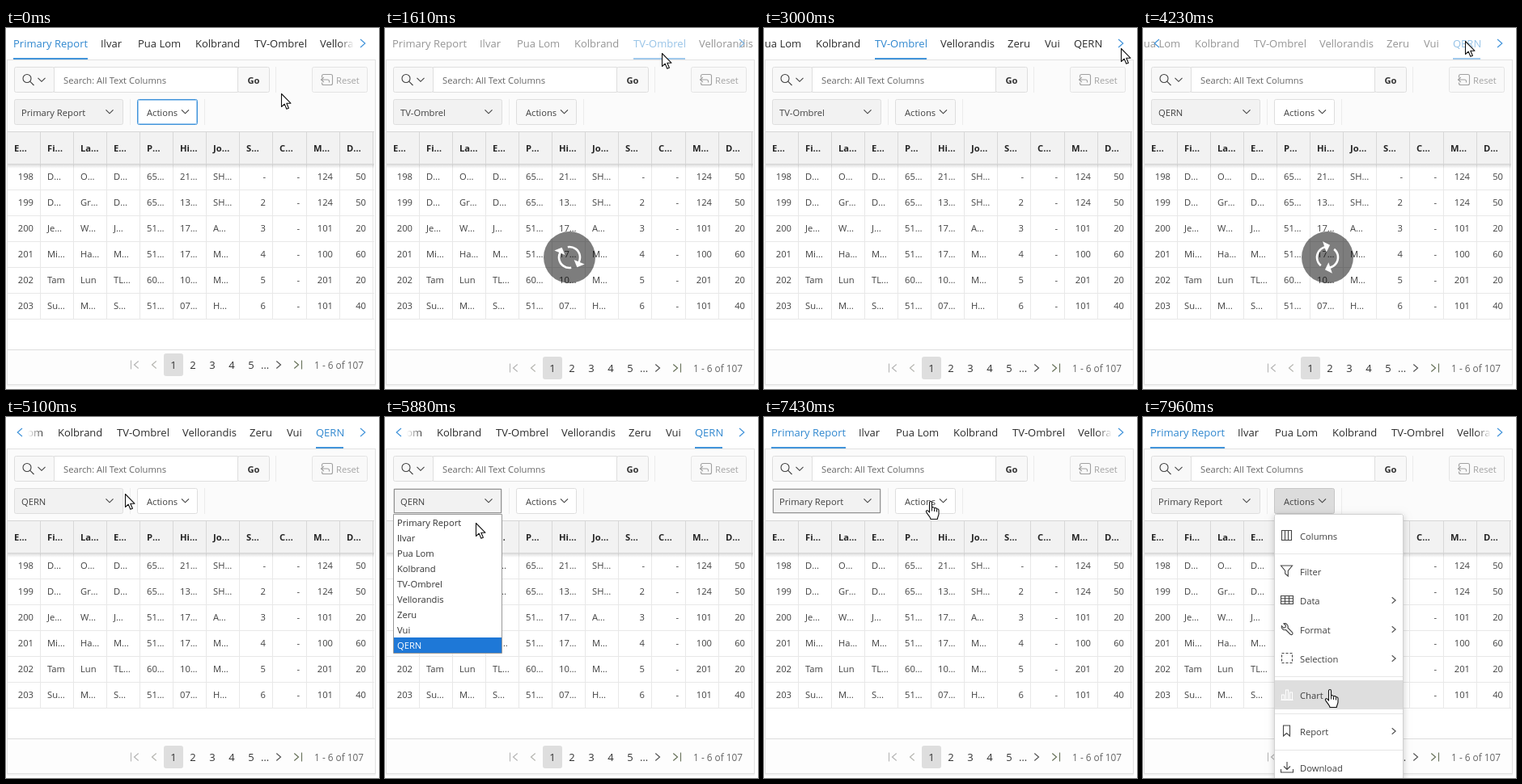
Write an HTML page with a canvas that moves like this. It is 461 px wide and 447 px high and loops after 8000 ms.

```html
<!DOCTYPE html>
<html lang="en">
<head>
<meta charset="utf-8">
<title>Report tabs</title>
<style>
html, body { margin: 0; width: 100%; height: 100%; overflow: hidden; background: #fff; }
canvas { display: block; width: 461px; height: 447px; }
</style>
</head>
<body>
<canvas id="stage"></canvas>
<script>
const W = 461, H = 447, LOOP = 8000, STEP = 77.35;
const BLUE = '#4294da', INK = '#404040', LINE = '#dedede';
const canvas = document.getElementById('stage');
const ctx = canvas.getContext('2d');
const dpr = window.devicePixelRatio || 1;
canvas.width = W * dpr;
canvas.height = H * dpr;

const TABS = [
  ['Primary Report', 9, 92], ['Ilvar', 117, 29], ['Pua Lom', 163, 54],
  ['Kolbrand', 234, 57], ['TV-Ombrel', 307, 64], ['Vellorandis', 388, 67],
  ['Zeru', 471, 30], ['Vui', 517, 20], ['QERN', 553, 34]
];
const HEADS = 'E Fi La E P Hi Jo S C M D'.split(' ');
const SHORT_HEADS = 'E Fi L E P H J S C M D'.split(' ');
const ROWS = [
  '198 D… O… D… 65… 21… SH… - - 124 50',
  '199 D… Gr… D… 65… 13… SH… 2 - 124 50',
  '200 Je… W… J… 51… 17… A… 3 - 101 20',
  '201 Mi… Ha… M… 51… 17… M… 4 - 100 60',
  '202 Tam Lun TL… 60… 10… M… 5 - 201 20',
  '203 Su… M… S… 51… 07… H… 6 - 101 40'
].map(r => r.split(' '));
const MENU = [
  ['Columns', 147], ['Filter', 191], ['Data', 227, 1], ['Format', 263, 1],
  ['Selection', 299, 1], ['Chart', 344], ['Report', 389, 1], ['Download', 434]
];
// Each load: tab, click, grid cleared, rows back, finished, spinner angle at a time
const LOADS = [
  { tab: 4, click: 1080, clear: 1225, data: 1385, end: 2310, deg: 65, at: 1610 },
  { tab: 8, click: 3535, clear: 3610, data: 3925, end: 4860, deg: 110, at: 4230 },
  { tab: 0, click: 6425, clear: 6425, data: 6880, end: 7185, deg: 0, at: 6660 }
];
const POINTER = [
  [0, 340, 82], [380, 340, 82], [760, 349, 52], [1080, 342, 32], [2310, 342, 32],
  [2700, 441, 26], [3160, 441, 26], [3390, 398, 17], [4780, 398, 17],
  [5095, 147, 96], [5300, 130, 104], [5570, 130, 104], [5880, 112, 132],
  [6110, 112, 132], [6270, 110, 143], [6880, 110, 143], [7260, 150, 124],
  [7420, 204, 105], [7500, 204, 107], [7955, 229, 338]
];

const clamp = v => Math.max(0, Math.min(1, v));
const ease = v => { v = clamp(v); return v * v * (3 - 2 * v); };

function fill(x, y, w, h, color) {
  ctx.fillStyle = color;
  ctx.fillRect(x, y, w, h);
}
function box(x, y, w, h, bg, border, r = 2) {
  ctx.beginPath();
  ctx.roundRect(x + .5, y + .5, w - 1, h - 1, r);
  ctx.fillStyle = bg;
  ctx.fill();
  ctx.strokeStyle = border;
  ctx.lineWidth = 1;
  ctx.stroke();
}
function text(s, x, y, { size = 11.2, color = INK, bold, align = 'left' } = {}) {
  ctx.font = `${bold ? 700 : 400} ${size}px "Open Sans", "Noto Sans", sans-serif`;
  ctx.fillStyle = color;
  ctx.textAlign = align;
  ctx.fillText(s, x, y);
}
function stroke(d, color = INK, w = 1.1, x = 0, y = 0) {
  ctx.save();
  ctx.translate(x, y);
  ctx.strokeStyle = color;
  ctx.lineWidth = w;
  ctx.stroke(new Path2D(d));
  ctx.restore();
}
const down = (x, y) => stroke('M-4.5 -2.2L0 2.3L4.5 -2.2', INK, 1.1, x, y);
function arrow(x, y, dir, color, bar, s = 1) {
  stroke(`M${-2.7 * dir * s} ${-4.5 * s}L${2.5 * dir * s} 0L${-2.7 * dir * s} ${4.5 * s}`, color, 1.2, x, y);
  if (bar) stroke('M0 -5.5V5.5', color, 1.1, x + 6.5 * dir, y);
}

function fade(x0, x1) {
  const g = ctx.createLinearGradient(x0, 0, x1, 0);
  g.addColorStop(0, '#fff0');
  g.addColorStop(1, '#fff');
  ctx.fillStyle = g;
  ctx.fillRect(Math.min(x0, x1), 0, Math.abs(x1 - x0), 36);
}

function drawTabs(s) {
  ctx.save();
  ctx.beginPath();
  ctx.rect(1, 0, 456, 40);
  ctx.clip();
  ctx.globalAlpha = s.dim ? .5 : 1;
  TABS.forEach(([name, x, w], i) => {
    x -= s.scroll;
    const on = i === s.tab;
    text(name, x, 24, { size: 13, color: on ? '#2f87cf' : '#2b2b2b' });
    if (on) fill(x, 37, w, 2, BLUE);
  });
  ctx.restore();
  if (!s.dim) {
    if (s.scroll < 169) { fade(412, 430); fill(430, 0, 31, 36, '#fff'); }
    if (s.left) { fill(0, 0, 27, 36, '#fff'); fade(46, 27); }
  }
  if (s.left) arrow(17, 19, -1, BLUE, false, 1.1);
  arrow(441, 19, 1, s.dim && s.scroll < 1 ? '#7fb5e4' : BLUE, false, 1.1);
}

function drawTools(s) {
  box(10, 48, 50, 32, '#f8f8f8', LINE);
  box(59, 48, 228, 32, '#fff', LINE, 0);
  box(286, 48, 40, 32, '#f8f8f8', LINE);
  ctx.beginPath();
  ctx.arc(26, 62.5, 5, 0, 7);
  ctx.strokeStyle = INK;
  ctx.lineWidth = 1.1;
  ctx.stroke();
  stroke('M29.6 66.2L34.5 71');
  down(44, 64);
  text('Search: All Text Columns', 71, 69, { color: '#666' });
  text('Go', 306, 69, { bold: true, color: '#333', align: 'center' });
  for (const [x, y] of [[333, 48], [153, 88], [245, 88]]) fill(x, y, 1, 32, '#ececec');

  box(378, 48, 69, 32, '#f9f9f9', '#e4e4e4');
  stroke('M1 4V2Q1 0 3 0H12Q14 0 14 2V11Q14 13 12 13H3Q1 13 1 11V10M0 6.5H8Q10 6.5 10 8.5V10M3.3 3.5L0 6.5L3.3 9.5', '#a0a0a0', 1.1, 389.5, 57.5);
  text('Reset', 408, 69, { color: '#a4a4a4' });

  box(10, 88, 135, 32, '#f2f2f2', LINE);
  if (s.selectFocus) {
    ctx.setLineDash([1, 1]);
    stroke('M11.5 89.5H143.5V118.5H11.5Z', '#333', 1);
    ctx.setLineDash([]);
  }
  text(TABS[s.tab][0], 19, 108.5);
  down(128, 103.5);

  const bg = s.menu ? '#dcdcdc' : s.actionSoft ? '#f8f8f8' : '#fff';
  box(162, 88, 75, 32, bg, s.actionFocus ? BLUE : s.menu ? '#c6c6c6' : LINE);
  if (s.actionFocus) stroke('M163.5 89.5H235.5V118.5H163.5Z', '#9dc9ee', 1);
  text('Actions', 174, 108.5);
  down(221.5, 103.5);
}

function drawGrid(s) {
  const colX = i => Math.round(s.empty ? 1 + i * 40 : .6 + i * 41.1);
  fill(2, 168, 454, 230, '#fff');
  fill(2, 128, 453, 41, '#f2f2f2');
  fill(2, 128, 453, 1, '#d6d6d6');
  fill(2, 168, 453, 1, '#d6d6d6');
  for (let i = 0; i < 11; i++) {
    fill(colX(i + 1), 129, 1, 39, '#d8d8d8');
    text((s.empty ? SHORT_HEADS : HEADS)[i] + '…', colX(i) + 9, 153, { bold: true, color: '#262626' });
  }
  if (s.empty) {
    if (s.hoverHead) {
      for (let y = 133; y < 165; y += 2) { fill(85, y, 1, 1, '#888'); fill(87, y, 1, 1, '#888'); }
      box(103, 133, 16, 16, '#fff', LINE);
      stroke('M-3.5 1.7L0 -1.8L3.5 1.7', '#666', 1.1, 111, 141);
    }
    return;
  }
  ROWS.forEach((row, r) => {
    const top = 169 + r * 32;
    fill(2, top + 31, 453, 1, '#e8e8e8');
    row.forEach((cell, c) => {
      fill(colX(c + 1), top, 1, 32, '#e8e8e8');
      const right = c === 0 || c > 6;
      text(cell, right ? colX(c + 1) - 8 : colX(c) + 9, top + 19, { align: right ? 'right' : 'left' });
    });
  });
  const shade = ctx.createLinearGradient(0, 169, 0, 174);
  shade.addColorStop(0, 'rgba(0,0,0,.13)');
  shade.addColorStop(1, 'rgba(0,0,0,0)');
  fill(2, 169, 453, 5, shade);
}

function drawFooter(s) {
  fill(2, 398, 454, 43, '#fdfdfd');
  fill(2, 398, 454, 1, LINE);
  if (s.empty) {
    arrow(352, 419, -1, '#aaa', true);
    arrow(374, 419, -1, '#aaa');
    arrow(398, 419, 1, '#aaa');
    arrow(420, 419, 1, '#aaa', true);
    return;
  }
  ctx.save();
  ctx.translate(0, s.pagerDrop);
  arrow(161, 417, -1, '#b5b5b5', true);
  arrow(183, 417, -1, '#b5b5b0');
  box(195, 403, 24, 28, '#dedede', '#dedede');
  for (let i = 0; i < 5; i++) text(i + 1, 207 + i * 24, 422, { size: 13, color: '#333', align: 'center' });
  text('…', 320, 422, { size: 13, align: 'center', color: '#333' });
  arrow(337, 417, 1, '#555');
  arrow(359, 417, 1, '#667058', true);
  text('1 - 6 of 107', 442, 422, { size: 11.8, color: '#666', align: 'right' });
  ctx.restore();
}

function drawSpinner(angle) {
  ctx.save();
  ctx.translate(228, 284);
  ctx.beginPath();
  ctx.arc(0, 0, 32, 0, 7);
  ctx.fillStyle = 'rgba(0,0,0,.51)';
  ctx.fill();
  ctx.rotate(angle);
  for (let i = 0; i < 2; i++) {
    ctx.beginPath();
    ctx.arc(0, 0, 13, Math.PI * 1.07, Math.PI * 1.82);
    ctx.strokeStyle = ctx.fillStyle = '#fff';
    ctx.lineWidth = 2.6;
    ctx.stroke();
    ctx.fill(new Path2D('M15 -14V-4H5Z'));
    ctx.rotate(Math.PI);
  }
  ctx.restore();
}

function drawList(s) {
  const h = 19;
  box(10, 120, 135, TABS.length * h + 2, '#fff', '#999', 0);
  TABS.forEach(([name], i) => {
    const on = i === s.pick;
    if (on) fill(11, 121 + i * h, 133, h, '#1e78d7');
    text(name, 15, 134.5 + i * h, { color: on ? '#fff' : '#333' });
  });
}

const ICONS = {
  Columns: 'M1 1.5H13V13.5H1ZM5 1.5V13.5M9 1.5V13.5',
  Filter: 'M0 1H14L8.8 7.5V14L5.2 11V7.5Z',
  Data: 'M0 2.5H15V12.5H0ZM0 5.8H15M0 9.2H15M5 2.5V12.5M10 2.5V12.5',
  Format: 'M3.5 .8L6 3.3L5.4 5.6L3.2 6.1L.8 3.7C0 7 3 9.5 6 8.5L11.5 14C13.5 15.5 15.5 13.5 14 11.5L8.5 6C9.5 2.5 6.5 0 3.5 .8Z',
  Selection: 'M1 1.5H14V13.5H1Z',
  Chart: 'M1 8H4V14H1ZM6 2H9V14H6ZM11 5H14V14H11ZM0 14.5H15',
  Report: 'M3 1H11V14L7 10.5L3 14Z',
  Download: 'M7.5 1V10M3.5 6.5L7.5 10.5L11.5 6.5M0 10V14H15V10'
};

function drawMenu(s) {
  ctx.save();
  ctx.shadowColor = 'rgba(0,0,0,.2)';
  ctx.shadowBlur = 8;
  ctx.shadowOffsetY = 2;
  fill(162, 120, 160, 340, '#fff');
  ctx.restore();
  box(162, 120, 160, 340, '#fff', '#d0d0d0');
  for (const y of [169, 321, 367, 412]) fill(163, y, 158, 1, '#e6e6e6');
  for (const [name, y, sub] of MENU) {
    const on = Math.abs(s.y + 6 - y) < 18;
    if (on) fill(163, y - 18, 158, 36, '#dedede');
    ctx.setLineDash(name === 'Selection' ? [3, 2] : []);
    stroke(ICONS[name], on ? '#fff' : '#444', 1.1, 170.5, y - 8);
    ctx.setLineDash([]);
    text(name, 194, y + 4.5);
    if (sub) arrow(310, y, 1, '#555', false, .85);
  }
}

function drawPointer(s) {
  const d = s.hand
    ? 'M0 1.5C0 -.6 3 -.6 3 1.5V8C3.3 6.7 6 7 6 8.6C6.6 7.6 9 8 9 9.6C9.8 8.8 11.5 9.4 11.5 11V15.5C11.5 17.5 10 19 9.8 22H1.5C1.3 19.5 -2.6 16 -4 13C-4.6 11.2 -2.4 10.6 -1.3 12L0 13.6Z'
    : 'M0 0V16L3.7 12.6L6.3 18.8L8.9 17.7L6.3 11.7H11.4Z';
  const p = new Path2D(d);
  ctx.save();
  ctx.translate(s.x + .5, s.y - .5);
  ctx.lineJoin = 'round';
  ctx.fillStyle = '#fff';
  ctx.strokeStyle = '#111';
  ctx.lineWidth = 1.1;
  ctx.fill(p);
  ctx.stroke(p);
  if (s.hand) stroke('M3 8V12M6 9V12.5M9 10V13', '#111', 1);
  ctx.restore();
}

function pointerAt(t) {
  let i = POINTER.findIndex(k => k[0] > t);
  if (i < 0) i = POINTER.length;
  const a = POINTER[i - 1], b = POINTER[i] || a;
  const k = b === a ? 0 : ease((t - a[0]) / (b[0] - a[0]));
  return { x: Math.round(a[1] + (b[1] - a[1]) * k), y: Math.round(a[2] + (b[2] - a[2]) * k) };
}

function stateAt(t) {
  const last = LOADS.filter(l => t >= l.click).pop();
  const busy = last && t < last.end;
  return {
    ...pointerAt(t),
    tab: last ? last.tab : 0,
    dim: busy && last.tab > 0,
    empty: busy && t >= last.clear && t < last.data,
    spin: busy && t >= last.clear ? (last.deg / 180 + (t - last.at) / 500) * Math.PI : null,
    scroll: t < 6425 ? Math.round(170 * ease((t - 2680) / 300)) : 0,
    left: t > 3200 && t < 6425,
    pagerDrop: t < LOADS[0].clear ? 0 : 4,
    actionFocus: t < 1080,
    actionSoft: t >= 1080 && t < 3535,
    selectFocus: t > 5400 && t < 7420,
    list: t > 5400 && t < 6425,
    pick: Math.round(8 * (1 - clamp((t - 6030) / 235))),
    hoverHead: t > 6425,
    menu: t > 7480,
    hand: t > 6425
  };
}

function draw(now) {
  const raw = now % LOOP;
  const t = raw < 375 ? 0 : 380 + STEP * Math.floor((raw - 380) / STEP + .35);
  const s = stateAt(t);
  ctx.setTransform(dpr, 0, 0, dpr, 0, 0);
  fill(0, 0, W, H, '#fff');
  fill(1, 39, 456, 403, '#e2e2e2');
  fill(1, 442, 456, 2, '#f3f3f3');
  fill(2, 40, 454, 401, '#fbfbfb');
  drawTabs(s);
  drawTools(s);
  drawGrid(s);
  drawFooter(s);
  if (s.spin !== null) drawSpinner(s.spin);
  if (s.list) drawList(s);
  if (s.menu) drawMenu(s);
  drawPointer(s);
}

const start = performance.now();
function tick() {
  draw(performance.now() - start);
  requestAnimationFrame(tick);
}
tick();
</script>
</body>
</html>
```
